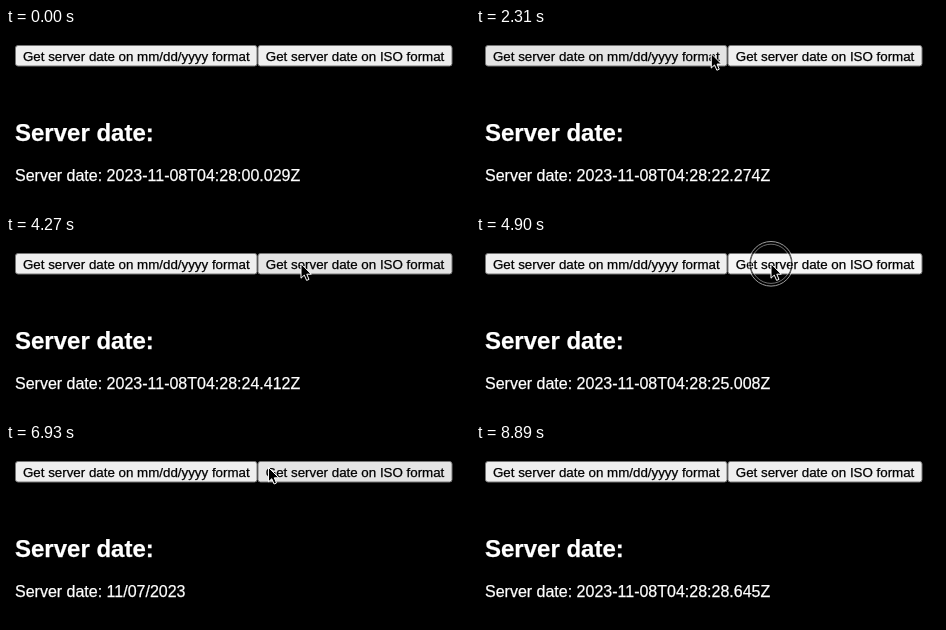
An HTML page that plays this animation: 464 by 180 pixels, repeating every 9870 ms.

```html
<!DOCTYPE html>
<html lang="en">
<head>
<meta charset="utf-8">
<title>Server date</title>
<style>
html, body { margin: 0; height: 100%; overflow: hidden; background: #000; }
svg { display: block; width: 464px; height: 180px; font-family: "Liberation Sans", Arial, sans-serif; }
rect { fill: #efefef; stroke: #767676; }
rect.hover { fill: #e4e4e4; }
rect.press { fill: #f5f5f5; }
text { fill: #fff; stroke: #fff; stroke-width: .25; font-size: 16px; }
.label { fill: #000; stroke: #000; font-size: 13.333px; }
.title { font-size: 24px; font-weight: bold; }
#ring { fill: none; stroke: #fff; opacity: .62; }
</style>
</head>
<body>
<svg viewBox="0 0 464 180">
  <rect x="9.5" y="17.5" width="241.5" height="20.5" rx="2.5"/>
  <rect x="252" y="17.5" width="194" height="20.5" rx="2.5"/>
  <text class="label" x="17" y="32.6">Get server date on mm/dd/yyyy format</text>
  <text class="label" x="259.8" y="32.6">Get server date on ISO format</text>
  <text class="title" x="9" y="113">Server date:</text>
  <text id="date" x="9" y="153"></text>
  <g id="pointer">
    <g id="ring">
      <circle r="20.9" stroke="#000" stroke-width="2"/>
      <circle r="22.3"/>
      <circle r="19.6" stroke-width=".7"/>
    </g>
    <path d="M0 0V14.4L3.3 11.3 5.6 16.6 8 15.6 5.8 10.4H10.3Z" stroke="#fff"/>
  </g>
</svg>
<script>
const LOOP = 9870, STEP = 70, RING = 140, REPLY = 210;
const EDGE = 251.5; // between the two buttons
const ENTER = 280, FOCUS = 770, LEAVE = 8890;
const $ = id => document.getElementById(id);
const buttons = document.querySelectorAll('rect');

// Where the pointer goes: start, duration, x, y
const moves = [
  [210, 490, 305, 30.5],
  [2030, 490, 190, 22.5],
  [3430, 280, 295, 27.8],
  [5320, 560, 205, 26],
  [6720, 350, 293.7, 22],
  [8610, 280, 300, 180]
];

// When it clicks, and the seconds the server sends back from the ISO button
const clicks = [
  [1470, '22.274'], [2590], [3780, '24.412'], [4340, '25.008'], [4900, '25.498'],
  [5950], [7070, '27.649'], [7770, '28.149'], [8190, '28.645']
];

function position(t) {
  let x = 243, y = 160;
  for (const [start, length, toX, toY] of moves) {
    const p = Math.min(1, Math.max(0, (t - start) / length));
    const e = p * p * (3 - 2 * p);
    x += (toX - x) * e;
    y += (toY - y) * e;
  }
  return [x, y];
}

function reply(t) {
  const click = clicks.findLast(c => t >= c[0] + REPLY) || [0, '00.029'];
  return click[1] ? `2023-11-08T04:28:${click[1]}Z` : '11/07/2023';
}

function draw(t) {
  const [x, y] = position(t);
  const visible = t >= ENTER && t < LEAVE;
  const pressed = [[FOCUS], ...clicks].some(([at]) => t >= at && t < at + RING);

  $('date').textContent = 'Server date: ' + reply(t);
  $('pointer').setAttribute('transform', `translate(${x} ${y})`);
  $('pointer').setAttribute('visibility', visible ? 'visible' : 'hidden');
  $('ring').setAttribute('display', pressed ? 'inline' : 'none');

  // The buttons react only after the first click has focused the page.
  const live = visible && t >= clicks[0][0] && y > 17 && y < 39;
  const state = pressed ? 'press' : 'hover';
  buttons.forEach((b, i) => b.setAttribute('class', live && (x > EDGE) == i ? state : ''));
}

function tick() {
  const t = performance.now() % LOOP;
  draw(Math.floor(t / STEP) * STEP);
  requestAnimationFrame(tick);
}
tick();
</script>
</body>
</html>
```
